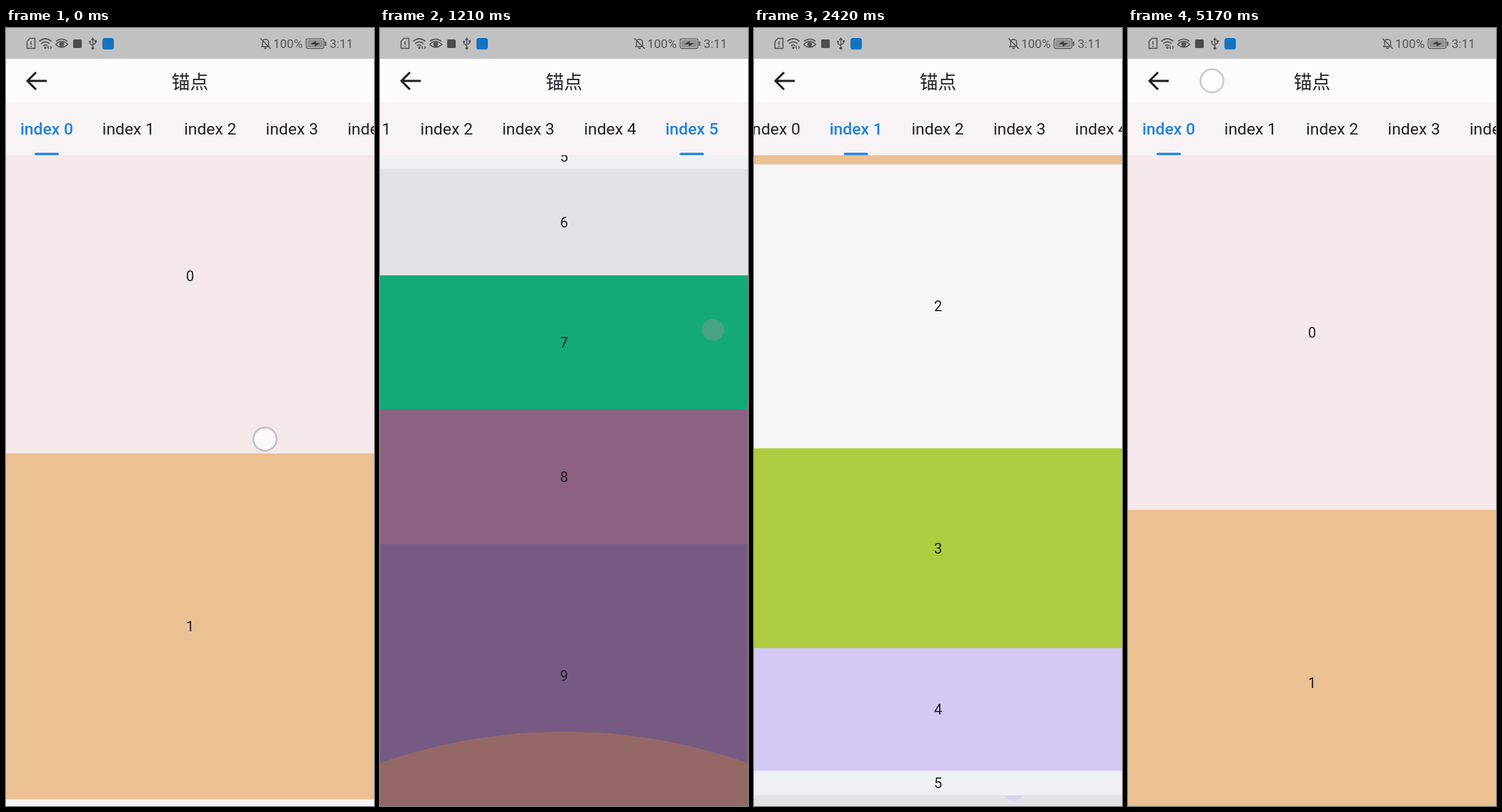
An HTML page with a canvas for the animation above (5280 ms loop, 515 px wide and 1088 px high).

```html
<!DOCTYPE html>
<html lang="zh">
<head>
<meta charset="utf-8">
<style>
html, body { margin: 0; width: 100%; height: 100%; overflow: hidden; background: #f4e8ea; }
canvas { display: block; }
</style>
</head>
<body>
<canvas id="stage" width="515" height="1088"></canvas>
<script>
const W = 515, H = 1088, TOP = 178, STEP = 110, LOOP = 5280;
const INK = '#212026', GREY = '#555456', BLUE = '#1f81dc';
const c = document.getElementById('stage').getContext('2d');

// height and colour of each section
const sections = [
  [496, '#f4e8ea'], [483.7, '#ebc093'], [397, '#f7f5f8'], [279.5, '#adcc3f'],
  [171.5, '#d4c8f5'], [34.5, '#eff0f4'], [149, '#e2e3e7'], [187.5, '#14aa77'],
  [188.5, '#8c6182'], [367, '#765a84']
];
let sum = 0;
const starts = sections.map(([h]) => (sum += h) - h);

// [step, value] points, linear in between
const scrollKeys = [
  [0, 79], [1, 214], [2, 404], [3, 680], [4, 880], [5, 1040], [6, 1166], [7, 1245],
  [8, 1290], [9, 1462], [10, 1700], [11, 1843.4], [16, 1843.4], [17, 1815], [18, 1665],
  [19, 1408], [20, 1252], [21, 1090], [22, 967], [23, 880], [24, 640], [25, 370],
  [26, 165], [27, 55.5], [28, 36], [30, 15], [32, 0]
];
const tabKeys = [
  [4, 0], [5, 10], [6, 24.8], [7, 28], [8, 28], [9, 60], [10, 135], [11, 192.6],
  [18, 192.6], [19, 192.2], [20, 120], [21, 56], [22, 28.7], [23, 18], [24, 6], [25, 0]
];

// finger paths: first step, then one point per step
const touches = [
  [0, [362.5, 575], [368, 440], [378, 250]],
  [8, [455, 832], [460, 660], [466, 422]],
  [16, [345, 481], [347, 509], [351, 659], [355.5, 915.5], [363, 1066]],
  [23, [345, 420], [350, 660], [356, 930]],
  [36, [338, 542], [236, 665]],
  [46, [117.5, 74], [117.5, 74]]
];

function at(keys, x) {
  if (x <= keys[0][0]) return keys[0][1];
  for (let i = 1; i < keys.length; i++) {
    const [a, u] = keys[i - 1], [b, v] = keys[i];
    if (x <= b) return u + (v - u) * (x - a) / (b - a);
  }
  return keys[keys.length - 1][1];
}

function box(x, y, w, h, fill) {
  c.fillStyle = fill;
  c.fillRect(x, y, w, h);
}

function round(x, y, w, h, r, fill) {
  c.fillStyle = fill;
  c.beginPath();
  c.roundRect(x, y, w, h, r);
  c.fill();
}

function disc(x, y, r, fill) {
  c.fillStyle = fill;
  c.beginPath();
  c.arc(x, y, r, 0, 7);
  c.fill();
}

function line(d, width, color = GREY) {
  c.strokeStyle = color;
  c.lineWidth = width;
  c.stroke(new Path2D(d));
}

function text(s, x, y, size, color = INK, weight = 400, align = 'center') {
  c.font = `${weight} ${size}px Roboto, "Noto Sans CJK SC", "Noto Sans CJK", sans-serif`;
  c.textAlign = align;
  c.fillStyle = color;
  c.fillText(s, x, y);
}

function clip(y, h, draw) {
  c.save();
  c.beginPath();
  c.rect(0, y, W, h);
  c.clip();
  draw();
  c.restore();
}

// overscroll glow growing from the bottom edge, or from the top one
function glow(height, alpha, atTop) {
  c.save();
  c.translate(W / 2, atTop ? TOP : H);
  c.scale(1, (atTop ? 1 : -1) * height / 104);
  c.beginPath();
  c.rect(-W / 2, 0, W, 104);
  c.clip();
  disc(0, 104 - W * 1.5, W * 1.5, `rgba(218,137,40,${alpha})`);
  c.restore();
}

function drawSections(scroll, n) {
  sections.forEach(([h, color], i) => {
    const y = TOP + starts[i] - scroll;
    if (y > H || y + h < TOP) return;
    box(0, y, W, h + 1, color);
    text(i, W / 2, y + h / 2 + 7.2, 20);
  });
  if (n >= 11 && n < 14) glow([104, 74, 42][n - 11], [0.3, 0.2, 0.1][n - 11], false);
  if (n === 32) glow(69, 0.05, true);
}

function drawTabs(scroll, shift) {
  const active = Math.min(5, starts.filter(y => y <= scroll).length - 1);
  box(0, 104, W, 74, '#f8f3f5');
  for (let i = 0; i < 6; i++) {
    const x = 57 + 114.4 * i - shift, on = i === active;
    text('index ' + i, x, 148.6, 22.9, on ? BLUE : INK, on ? 500 : 400);
    if (on) round(x - 17, 174.6, 34, 3.2, 1.6, BLUE);
  }
}

function drawHeader() {
  box(0, 43, W, 61, '#fdfbfc');
  line('M57 74H30M42 62L30 74L42 86', 2.9, '#1f1e20');
  text('锚点', W / 2, 84.5, 25.7, INK, 500);
}

function drawStatus() {
  box(0, 0, W, 43, '#c2c1c2');
  // card
  line('M33.5 14.5H40.5V28.5H29.5V18.5ZM35 18.5V23.5M35 25V26.8', 1.6);
  // signal
  line('M46.5 18.5Q55 11.5 63.5 18.5M49.2 21.8Q55 17 61 21.8M52 25Q55 22.4 58 25', 1.7);
  disc(55, 27.6, 1.6, GREY);
  line('M60 25.5L58.3 27.3L60 29M62 25.5L63.7 27.3L62 29', 1.2);
  // eye
  line('M69.5 23Q78 14.5 86.5 23Q78 31 69.5 23M70 18.5Q78 12.5 86 18.5', 1.6);
  disc(78, 22.8, 3.4, GREY);
  round(94, 16, 12, 12, 1.5, '#4c4b4d');
  // cable
  line('M121.5 16V28M121.5 25L117.5 22V19M121.5 23.5L125.5 21V18.5M119.5 17L121.5 14.3L123.5 17', 1.4);
  disc(121.5, 28.2, 2, GREY);
  disc(117.5, 19, 1.5, GREY);
  box(124, 17, 3, 3, GREY);
  round(135, 14, 16, 16, 3.5, '#1273c2');
  // muted bell
  line('M356 14.5L370.5 29M357 26H368.5M359 26V20Q359 16 363 15.7Q367.5 16 367.5 20V25', 1.5);
  box(361.5, 27.3, 3.2, 2, GREY);
  text('100%', 374, 28, 17, GREY, 400, 'left');
  // battery
  c.strokeStyle = GREY;
  c.lineWidth = 1.2;
  c.beginPath();
  c.roundRect(420, 15, 25, 13.6, 2.5);
  c.stroke();
  round(421.6, 16.6, 21.8, 10.4, 1.2, '#929193');
  box(446.3, 19, 2, 6, GREY);
  c.fillStyle = '#3f3e40';
  c.fill(new Path2D('M426 22.5L433.5 18V21L439.5 21.3L432 26V23Z'));
  text('3:11', 453, 28, 17, GREY, 400, 'left');
}

function drawTouch(n) {
  for (const [first, ...path] of touches) {
    const p = path[n - first];
    if (!p) continue;
    disc(p[0], p[1], 15.5, 'rgba(255,255,255,.7)');
    c.strokeStyle = 'rgba(150,152,165,.52)';
    c.lineWidth = 2.4;
    c.beginPath();
    c.arc(p[0], p[1], 16.2, 0, 7);
    c.stroke();
  }
  if (n === 11) disc(466, 422, 15.5, 'rgba(150,150,150,.4)');
  if (n === 22) clip(1073, 15, () => disc(363, 1066, 15, 'rgba(212,200,245,.6)'));
}

function frame(now) {
  const n = Math.floor(now % LOOP / STEP);
  const scroll = at(scrollKeys, n);
  clip(TOP, H - TOP, () => drawSections(scroll, n));
  drawTabs(scroll, at(tabKeys, n));
  drawHeader();
  drawStatus();
  drawTouch(n);
  requestAnimationFrame(() => frame(performance.now() - begin));
}

const begin = performance.now();
frame(0);
</script>
</body>
</html>
```
